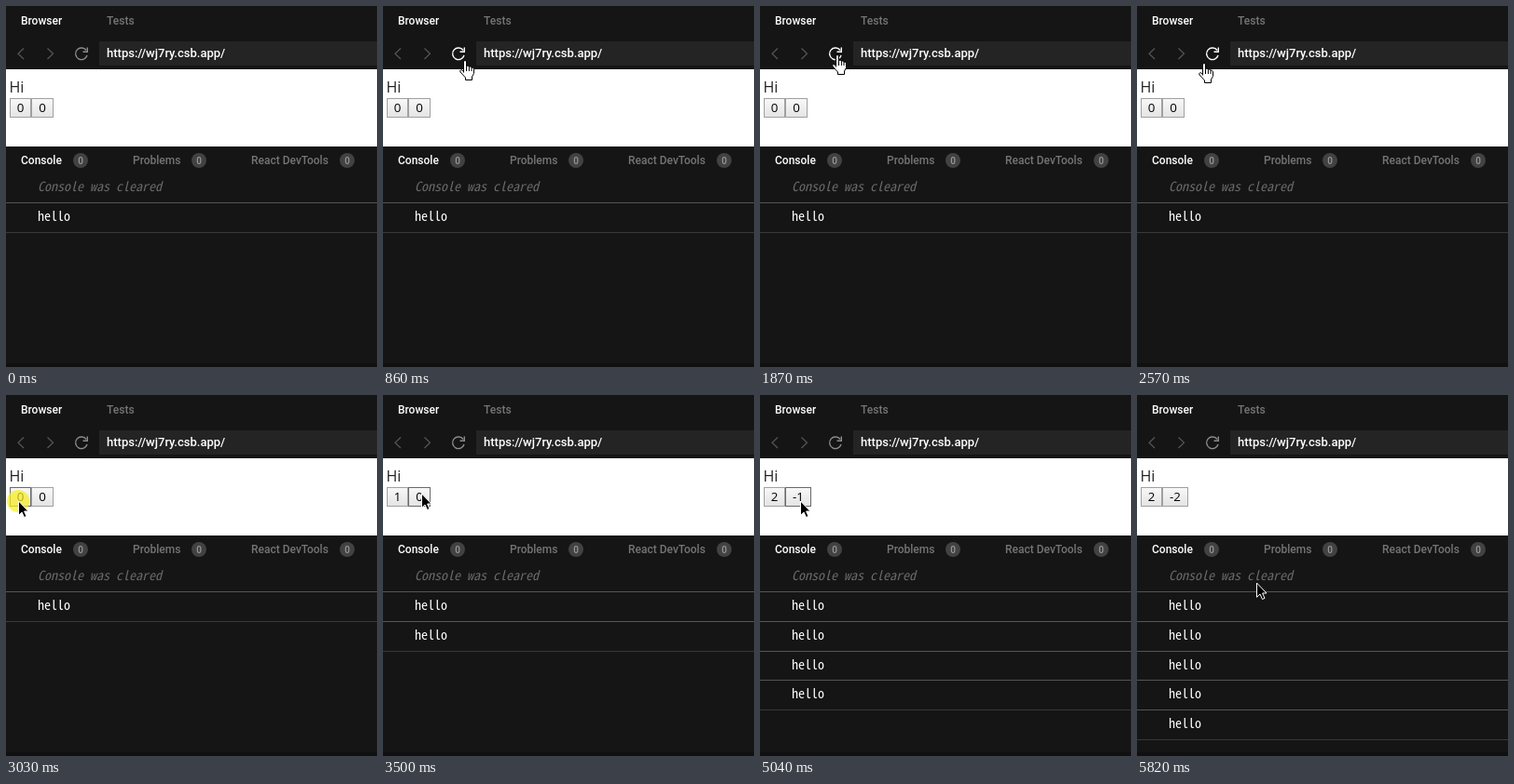
Write an HTML page that moves like this. It is 398x388 px and loops after 5880 ms.

```html
<!DOCTYPE html>
<html lang="en">
<head>
<meta charset="utf-8">
<title>Console demo</title>
<style>
  html, body { margin: 0; width: 100%; height: 100%; overflow: hidden; background: #151515; }
  svg { display: block; width: 398px; height: 388px; }
  text { white-space: pre; }
  .ui { font: 500 12px Roboto, sans-serif; fill: #757575; }
  .ui .on { fill: #fff; }
  .badge circle { fill: #424242; }
  .badge text { font: 500 10px Roboto, sans-serif; fill: #999; text-anchor: middle; }
  .url { font: 500 13px Roboto, sans-serif; fill: #fff; }
  .log { font: 14px "Noto Sans Mono CJK KR", "Noto Sans Mono CJK JP", monospace; fill: #fff; }
  .log .note { font-style: italic; fill: #6a6a6a; }
  .page { font: 16px "Open Sans", "Noto Sans", sans-serif; fill: #222; }
  .btn rect { fill: url(#face); stroke: #a0a0a0; }
  .btn text { font-size: 13.33px; fill: #000; text-anchor: middle; }
  .btn.hover rect { stroke: #6a6a6a; }
  .icon { fill: none; stroke: #555; stroke-width: 1.2; }
  #reload { stroke: #8c8c8c; stroke-width: 1.4; }
  #reload.hover { stroke: #fff; }
</style>
</head>
<body>
<svg viewBox="0 0 398 388">
  <defs>
    <linearGradient id="face" x2="0" y2="1">
      <stop stop-color="#f8f8f8"/><stop offset="1" stop-color="#e4e4e4"/>
    </linearGradient>
  </defs>
  <rect width="398" height="388" fill="#151515"/>
  <rect y="384" width="398" height="4" fill="#101010"/>
  <rect x="100" y="38" width="298" height="26" fill="#242424"/>
  <rect y="68" width="398" height="83" fill="#fff"/>

  <g class="ui">
    <text class="on" x="16" y="20">Browser</text>
    <text x="108" y="20">Tests</text>
    <text class="on" x="16" y="170">Console</text>
    <text x="136" y="170">Problems</text>
    <text x="263" y="170">React DevTools</text>
  </g>
  <g class="badge">
    <circle cx="80" cy="166" r="8"/><text x="80" y="169.5">0</text>
    <circle cx="207" cy="166" r="8"/><text x="207" y="169.5">0</text>
    <circle cx="366" cy="166" r="8"/><text x="366" y="169.5">0</text>
  </g>
  <path class="icon" d="M19 45.5L13 51.2L19 57M44.500 45.500L50.500 51.200L44.500 57"/>
  <path class="icon" id="reload" d="M86 47.500A6.300 6.300 0 1 0 87 53M87.300 44.500V49.300H82.500"/>
  <text class="url" x="108" y="55">https://wj7ry.csb.app/</text>

  <g class="page" id="page">
    <text x="3.500" y="93">Hi</text>
    <g class="btn" id="up"><rect x="4.500" y="99.500" width="22" height="20"/><text x="15.500" y="114">0</text></g>
    <g class="btn" id="down"><rect x="27.500" y="99.500" width="23" height="20"/><text x="39" y="114">0</text></g>
  </g>

  <g class="log" id="log"><text class="note" x="34" y="199">Console was cleared</text></g>

  <circle id="click" r="12" fill="#f8ee20" fill-opacity=".72"/>
  <g id="cursor">
    <path id="arrow" transform="translate(0 -1)" fill="#000" stroke="#fff"
      d="M.5 1V16.300L4 13L6.500 18.500L9 17.400L6.600 12H11Z"/>
    <path id="hand" transform="translate(-4 -2)" fill="#fff" stroke="#000" stroke-linejoin="round"
      d="M4.500 13.500V2Q4.500 .5 6 .5T7.500 2V7.500Q7.700 6 9 6T10.400 7.800Q10.800 6.800 12 6.900T13 8.700Q13.300 7.900 14.300 8.200T15.500 9.800V14.500L13.500 18V21.500H6.500V19L1 13Q.2 11.500 1.500 10.800T4.500 12.500M7.500 7.500V12M10.400 8V12M13 8.700V12"/>
  </g>
</svg>
<script>
const LOOP = 5880, TICK = 78;
const $ = id => document.getElementById(id);
const show = (el, on) => el.setAttribute('visibility', on ? 'inherit' : 'hidden');

// [start, steps, x, y]: the pointer glides to x,y in that many ticks
const moves = [
  [80, 1, 14, 39], [160, 1, 15, 38], [310, 6, 90, 63], [778, 2, 86, 60],
  [940, 2, 81, 54], [2420, 8, 13, 113], [3030, 1, 13, 114], [3340, 3, 41, 106],
  [4190, 1, 41, 108], [4270, 3, 17, 111], [4800, 4, 43, 114], [5740, 2, 128, 202]
];
const clicks = [[1090, 1170], [2960, 3110], [3720, 3890], [4580, 4720], [5270, 5500]];
const ups = [3110, 4720], downs = [3720, 5500], logs = [3110, 3890, 4720, 5500];

const count = (times, t) => times.filter(s => t >= s).length;
const within = (t, a, b) => t >= a && t < b;
const ease = p => p * p * (3 - 2 * p);

const rows = [], lines = [];
const make = (tag, attrs) => {
  const el = document.createElementNS('http://www.w3.org/2000/svg', tag);
  for (const k in attrs) el.setAttribute(k, attrs[k]);
  return $('log').appendChild(el);
};
for (let i = 0; i < 6; i++) {
  const y = Math.round(211 + 31.75 * i);
  lines.push(make('rect', { y, width: 398, height: 1 }));
  if (i < 5) {
    rows.push(make('text', { x: 34, y: y + 20 }));
    rows[i].textContent = 'hello';
  }
}

function pointer(t) {
  let x = 14, y = 39;
  for (const [start, steps, tx, ty] of moves) {
    if (t < start) break;
    const p = ease(Math.min(1, (Math.floor((t - start) / TICK) + 1) / steps));
    x += (tx - x) * p;
    y += (ty - y) * p;
  }
  return [Math.round(x), Math.round(y)];
}

function setButton(id, value, left, width, hover) {
  const [rect, label] = $(id).children;
  rect.setAttribute('width', width - 1);
  label.setAttribute('x', left + width / 2);
  label.textContent = value;
  $(id).classList.toggle('hover', hover);
}

function draw(t) {
  const [x, y] = pointer(t), live = t >= 80;
  const over = (a, b, c, d) => live && within(x, a, c) && within(y, b, d);
  const onReload = over(70, 38, 98, 65);
  const down = count(downs, t), wide = down ? 28 : 24;

  $('reload').classList.toggle('hover', onReload);
  show($('page'), !within(t, 1490, 1870));
  setButton('up', count(ups, t), 4, 23, over(4, 99, 27, 120));
  setButton('down', down ? -down : 0, 27, wide, over(27, 99, 27 + wide, 120));

  const shown = within(t, 1720, 1870) ? 0 : 1 + count(logs, t);
  rows.forEach((row, i) => show(row, i < shown));
  lines.forEach((line, i) => {
    show(line, i <= shown);
    line.setAttribute('fill', i < shown ? '#555' : '#383838');
  });

  show($('click'), clicks.some(([a, b]) => within(t, a, b)));
  $('click').setAttribute('transform', `translate(${x} ${y})`);
  show($('cursor'), live);
  show($('arrow'), live && !onReload);
  show($('hand'), onReload);
  $('cursor').setAttribute('transform', `translate(${x} ${y})`);
}

const begin = performance.now();
function frame() {
  draw((performance.now() - begin) % LOOP);
  requestAnimationFrame(frame);
}
frame();
</script>
</body>
</html>
```
